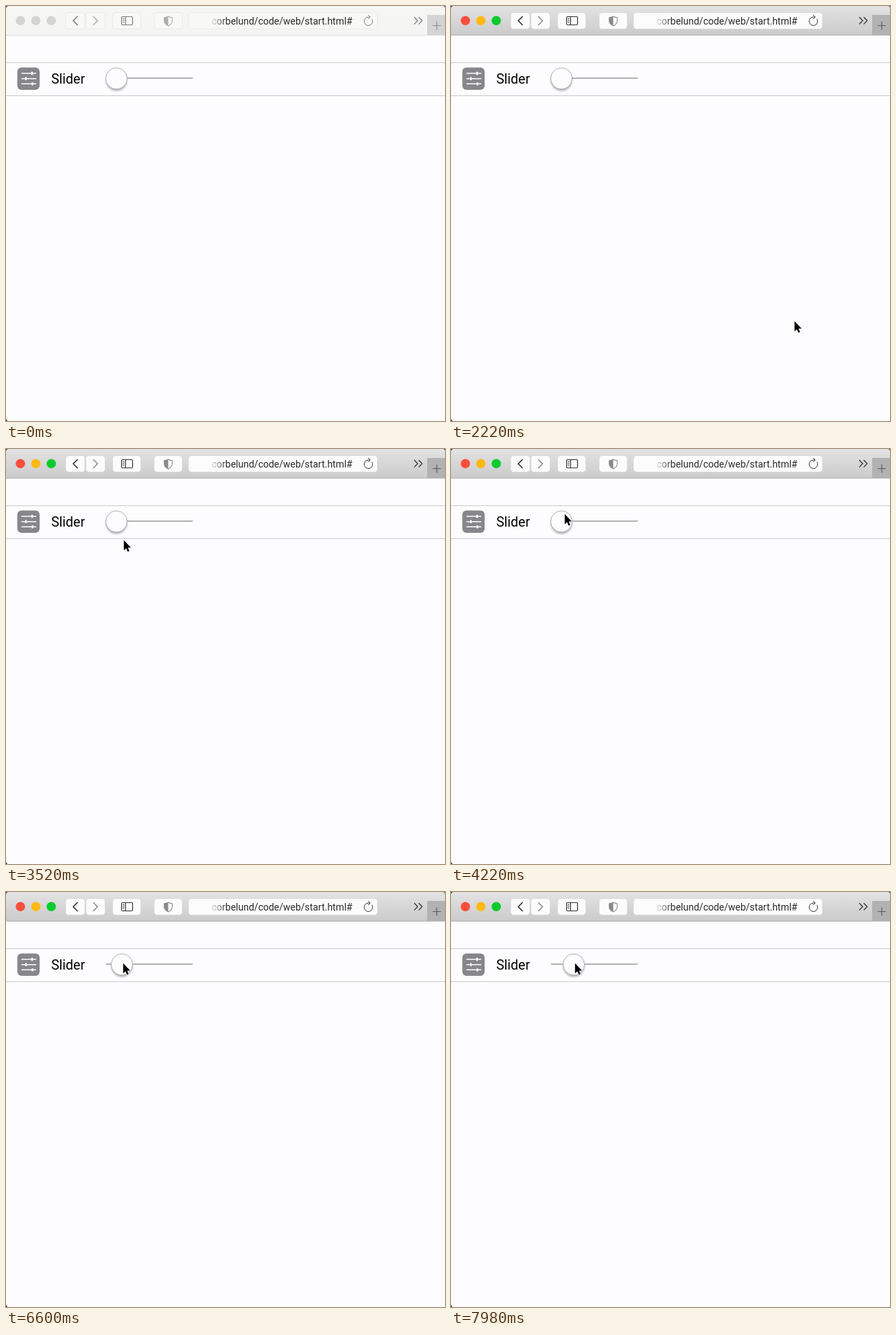
Write an HTML page that moves like this. It is 640 by 604 pixels and loops after 8 s.

```html
<!DOCTYPE html>
<html lang="en">
<head>
<meta charset="utf-8">
<title>Slider</title>
<style>
  html, body { margin: 0; width: 100%; height: 100%; overflow: hidden; background: #fdfdff; }
  svg {
    display: block; width: 100%; height: 100%;
    --top: #f6f6f5; --bottom: #f5f5f3; --edge: #dcdcd8; --button: #f8f8f7; --outline: #e6e6e2;
    --ink: #7c7c7c; --dim: #adadad; --tab: #d4d4d4; --plus: #8c8c8c;
    --red: #d4d4d2; --amber: #d4d4d2; --green: #d4d4d2;
  }
  svg.active {
    --top: #e3e3e3; --bottom: #cbcbcc; --edge: #b4b4b4; --button: #fcfcfc; --outline: #d6d6d6;
    --ink: #303030; --dim: #8a8a8a; --tab: #b2b2b3; --plus: #5c5c5c;
    --red: #fc4e3c; --amber: #fdb913; --green: #07cb2c;
  }
  text { font-family: Roboto, Inter, sans-serif; }
  .bar { fill: url(#bar); }
  .button { fill: var(--button); stroke: var(--outline); stroke-width: .8; }
  .ink, .dim { fill: none; stroke: var(--ink); stroke-linecap: round; stroke-linejoin: round; }
  .dim { stroke: var(--dim); }
  .rule { fill: #cbcbcf; }
</style>
</head>
<body>
<svg id="stage" viewBox="0 0 640 604" preserveAspectRatio="none">
  <defs>
    <linearGradient id="bar" x2="0" y2="1">
      <stop offset="0" style="stop-color:var(--top)"/>
      <stop offset="1" style="stop-color:var(--bottom)"/>
    </linearGradient>
    <linearGradient id="fade" gradientUnits="userSpaceOnUse" x1="296" x2="322">
      <stop offset="0" stop-color="#000"/>
      <stop offset="1" stop-color="#fff"/>
    </linearGradient>
    <mask id="reveal" maskUnits="userSpaceOnUse" x="296" y="8" width="220" height="28">
      <rect x="296" y="8" width="220" height="28" fill="url(#fade)"/>
    </mask>
    <filter id="soft" x="-50%" y="-50%" width="200%" height="200%">
      <feGaussianBlur stdDeviation="1.6"/>
    </filter>
  </defs>

  <rect width="640" height="604" fill="#fdfdff"/>

  <rect class="bar" width="640" height="42"/>
  <rect y="42" width="640" height="1" style="fill:var(--edge)"/>
  <g id="lights"></g>
  <g id="buttons"></g>

  <path class="ink" stroke-width="1.7" d="M104 15.5l-6 6 6 6"/>
  <path class="dim" stroke-width="1.5" d="M127.5 15.5l6 6-6 6"/>
  <g class="ink" stroke-width="1.2">
    <rect x="168.5" y="15.5" width="16" height="12" rx="1.5"/>
    <path d="M174.3 15.5v12"/>
    <path stroke-width="1" d="M170.6 18.3h1.6m-1.6 2.5h1.6m-1.6 2.5h1.6"/>
  </g>
  <path class="dim" stroke-width="1.1" d="M236.5 15q3 1.8 5.8 1.8v5q0 4.4-5.8 7.200q-5.8-2.8-5.8-7.200v-5q2.8 0 5.8-1.8z"/>
  <path d="M236.5 15v14q-5.8-2.8-5.8-7.200v-5q2.8 0 5.8-1.8z" style="fill:var(--dim)"/>
  <g mask="url(#reveal)">
    <text x="505" y="27" font-size="14" text-anchor="end" fill="#2a2a2a">corbelund/code/web/start.html#</text>
  </g>
  <path class="ink" stroke-width="1" d="M533.8 19.2A6.2 6.2 0 1 1 528.5 16h2M528.2 13.200l2.8 2.8-2.8 2.8"/>
  <path class="ink" stroke-width="1.3" d="M595.5 16.5l4.700 4.800-4.700 4.800M602 16.5l4.700 4.800-4.700 4.800"/>
  <rect x="614" y="13" width="26" height="29" style="fill:var(--tab)"/>
  <path d="M622 28.5h12M628 22.5v12" style="stroke:var(--plus)" stroke-width="1.2"/>

  <rect class="rule" y="82" width="640" height="1"/>
  <rect class="rule" y="130" width="640" height="1"/>
  <rect x="16.5" y="89.5" width="32.5" height="32.5" rx="6" fill="#86868b"/>
  <g stroke="#fdfdff" stroke-width="1.5" stroke-linecap="round">
    <path d="M23 98h20.5M23 105.7h20.5M23 113.3h20.5"/>
    <path stroke-width="2.4" d="M38 96.8v2.4M29 104.5v2.4M38.5 112.1v2.4"/>
  </g>
  <text x="66" y="113" font-size="19.5" fill="#000">Slider</text>
  <rect x="145.5" y="104" width="127" height="2" rx="1" fill="#b2b2b5"/>
  <g id="knob">
    <circle cy="2.5" r="15.5" fill="#707078" opacity=".55" filter="url(#soft)"/>
    <circle r="15.5" fill="#fdfdff" stroke="#a8a8ac" stroke-width=".9"/>
  </g>

  <path d="M0 0h4Q0 0 0 4zM640 0h-3Q640 0 640 3zM0 604h2.5Q0 603 0 599z" fill="#3a2412"/>

  <g id="cursor">
    <path d="M.8.8V15.6L4.200 12.500L6.500 17.500L8.800 16.500L6.700 11.600H11.200Z" fill="#000"
      stroke="#fdfdfd" stroke-width="1.6" stroke-linejoin="round" paint-order="stroke"/>
  </g>
</svg>
<script>
const LOOP = 8000, ACTIVATE = 1760, GRAB = 6000;
const $ = id => document.getElementById(id);
const stage = $('stage'), knob = $('knob'), cursor = $('cursor');

// time, x, y of the pointer tip
const path = [
  [640, 516, 606], [860, 508, 541], [1540, 500, 458], [2280, 500, 458],
  [2920, 177, 178], [3240, 175, 157], [3900, 165, 94], [4300, 165, 94],
  [5000, 161, 102], [GRAB, 161, 102], [6600, 170, 103], [7980, 180, 103]
];

function draw(tag, parent, attrs) {
  const el = document.createElementNS('http://www.w3.org/2000/svg', tag);
  for (const key in attrs) el.setAttribute(key, attrs[key]);
  parent.append(el);
}

['red', 'amber', 'green'].forEach((name, i) =>
  draw('circle', $('lights'), { cx: 21 + i * 22.5, cy: 21.2, r: 6.8, style: `fill:var(--${name})` }));

[[87, 28], [116.5, 28], [155.5, 41], [216, 41], [266, 275.5]].forEach(([x, width]) =>
  draw('rect', $('buttons'), { class: 'button', x, y: 9.5, width, height: 24, rx: 4.5 }));

function pointerAt(t) {
  const next = path.findIndex(p => p[0] > t);
  if (next === 0) return path[0].slice(1);
  if (next < 0) return path[path.length - 1].slice(1);
  const [t0, x0, y0] = path[next - 1], [t1, x1, y1] = path[next];
  let k = (t - t0) / (t1 - t0);
  if (t < GRAB) k *= k * (3 - 2 * k);
  return [x0 + (x1 - x0) * k, y0 + (y1 - y0) * k].map(Math.round);
}

function render(t) {
  const [x, y] = pointerAt(t);
  stage.classList.toggle('active', t >= ACTIVATE);
  cursor.setAttribute('transform', `translate(${x} ${y})`);
  cursor.setAttribute('visibility', t < path[0][0] ? 'hidden' : 'visible');
  knob.setAttribute('transform', `translate(${t < GRAB ? 161 : Math.max(161, x - 1)} 105.5)`);
}

const start = performance.now();
function tick() {
  render((performance.now() - start) % LOOP);
  requestAnimationFrame(tick);
}
tick();
</script>
</body>
</html>
```
